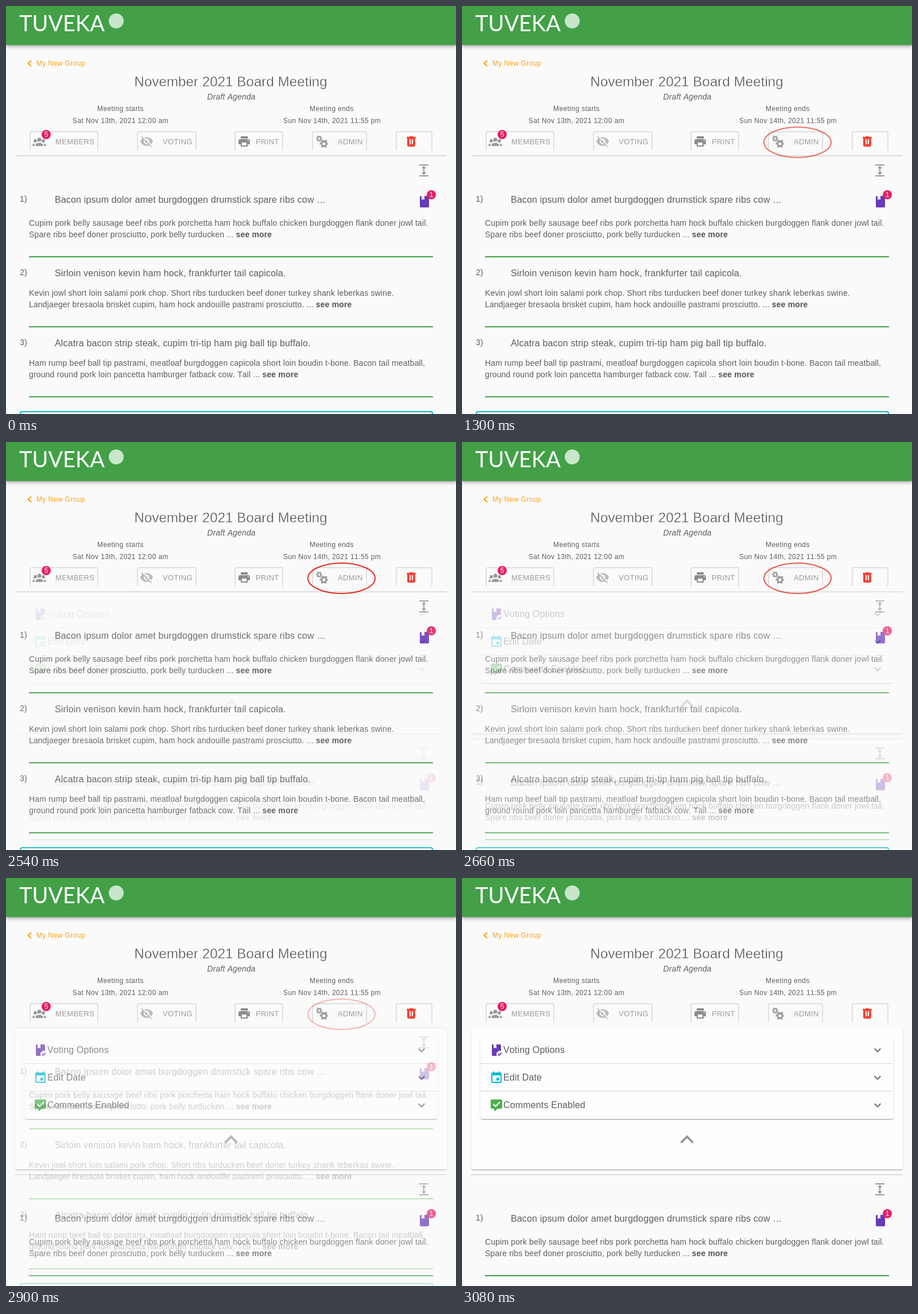
Animation, 784 px wide and 711 px high, one loop 5.08 s. Source, as an HTML page:

```html
<!DOCTYPE html>
<html lang="en">
<head>
<meta charset="utf-8">
<title>Board meeting agenda</title>
<style>
  html, body { margin: 0; width: 100%; height: 100%; overflow: hidden; background: #fafafa; }
  #stage { position: relative; width: 784px; height: 711px; overflow: hidden; background: #fafafa; }
  #stage div, svg { position: absolute; }
  svg { left: 0; top: 0; width: 784px; height: 711px; }
  #bar {
    left: 0; top: 0; width: 784px; height: 68px; background: #43a047;
    box-shadow: 0 2px 4px -1px rgba(0,0,0,.2), 0 4px 5px rgba(0,0,0,.14), 0 1px 10px rgba(0,0,0,.12);
  }
  #opened { inset: 0; opacity: 0; }
  #cover { left: 0; top: 257px; width: 784px; height: 454px; background: #fafafa; }
  .card {
    background: #fdfdfd; border-radius: 4px;
    box-shadow: 0 2px 1px -1px rgba(0,0,0,.2), 0 1px 1px rgba(0,0,0,.14), 0 1px 3px rgba(0,0,0,.12);
  }
  #drawer { left: 16px; top: 260px; width: 752px; height: 248px; }
  #options { left: 32px; top: 276px; width: 720px; height: 144px; }
  text { font-family: "Liberation Sans", Arial, sans-serif; font-kerning: none; fill: #5e5e5e; white-space: pre; }
  .title { font-size: 24px; letter-spacing: .1px; stroke: #fafafa; stroke-width: .45px; fill: #525252; }
  .head { font-size: 16px; letter-spacing: .15px; }
  .body { font-size: 14px; letter-spacing: .15px; }
  .small { font-size: 12px; letter-spacing: .4px; }
  .button { font-size: 13px; letter-spacing: .37px; fill: #9b9b9b; }
  .badge { font-size: 12px; fill: #fff; text-anchor: middle; }
  .brand { font: 38px Lato, sans-serif; fill: #fff; }
  .more { font-weight: bold; fill: #555; }
</style>
</head>
<body>
<div id="stage">
  <div id="bar"></div>
  <svg id="top"></svg>
  <svg id="closed"></svg>
  <div id="opened">
    <div id="cover"></div>
    <div id="drawer" class="card"></div>
    <div id="options" class="card"></div>
    <svg id="openedArt"></svg>
  </div>
  <svg><ellipse id="ring" cx="584.5" cy="237.5" rx="58.5" ry="26.5" fill="none" stroke="#e11b0c" stroke-width="2" opacity="0"/></svg>
</div>
<script>
const $ = id => document.getElementById(id);
const GREEN = '#43a047', GRAY = '#9a9a9a', PURPLE = '#673ab7';

const text = (cls, x, y, s, extra = '') => `<text class="${cls}" x="${x}" y="${y}" ${extra}>${s}</text>`;
const rect = (x, y, w, h, fill) => `<rect x="${x}" y="${y}" width="${w}" height="${h}" fill="${fill}"/>`;
const icon = (x, y, fill, d, scale = 1) =>
  `<path transform="translate(${x} ${y}) scale(${scale})" fill="${fill}" fill-rule="evenodd" d="${d}"/>`;
const badge = (x, y, n) => `<circle cx="${x}" cy="${y}" r="8" fill="#e91e63"/>` + text('badge', x, y + 4.2, n);

const ICONS = {
  eyeOff: 'M11.83 9L15 12.16V12A3 3 0 0 0 12 9ZM7.53 9.8L9.08 11.35A3 3 0 0 0 12.65 14.92L14.2 16.47A5 5 0 0 1 7.53 9.8ZM2 4.27L4.73 7C3.08 8.3 1.78 10 1 12C2.73 16.39 7 19.5 12 19.5C13.55 19.5 15.03 19.2 16.38 18.66L19.73 22L21 20.73L3.27 3ZM12 7A5 5 0 0 1 16.64 13.82L19.57 16.75C21.07 15.5 22.27 13.86 23 12C21.27 7.61 17 4.5 12 4.5C10.6 4.5 9.26 4.75 8 5.2L10.17 7.35C10.74 7.13 11.35 7 12 7Z',
  printer: 'M19 8H5a3 3 0 0 0-3 3v6h4v4h12v-4h4v-6a3 3 0 0 0-3-3zm-3 11H8v-5h8zm3-7a1 1 0 1 1 0-2 1 1 0 0 1 0 2zM18 3H6v4h12z',
  trash: 'M9 3V4H4V6H5V19A2 2 0 0 0 7 21H17A2 2 0 0 0 19 19V6H20V4H15V3ZM9 8H11V17H9ZM13 8H15V17H13Z',
  book: 'M18 22A2 2 0 0 0 20 20V4A2 2 0 0 0 18 2H12V9L9.5 7.5L7 9V2H6A2 2 0 0 0 4 4V20A2 2 0 0 0 6 22Z',
  bookCheck: 'M16.75 22.16L14 19.16L15.16 18L16.75 19.59L20.34 16L21.5 17.41ZM18 2A2 2 0 0 1 20 4V13.34A6 6 0 0 0 12.8 22H6A2 2 0 0 1 4 20V4A2 2 0 0 1 6 2H7V9L9.5 7.5L12 9V2Z',
  calendar: 'M17 12h-5v5h5zM16 1v2H8V1H6v2H5a2 2 0 0 0-2 2V19a2 2 0 0 0 2 2h14a2 2 0 0 0 2-2V5a2 2 0 0 0-2-2h-1V1zm3 18H5V8h14z',
  comment: 'M9 22A1 1 0 0 1 8 21V18H4A2 2 0 0 1 2 16V4A2 2 0 0 1 4 2H20A2 2 0 0 1 22 4V16A2 2 0 0 1 20 18H13.9L10.2 21.7Q9.8 22 9 22Z',
  down: 'M7.41 8.59L12 13.17l4.59-4.58L18 10l-6 6-6-6z',
  up: 'M7.41 15.41L12 10.83l4.59 4.58L18 14l-6-6-6 6z',
  fit: 'M0 0H16V2H0ZM0 19H16V21H0ZM8 2.5L12 7H9V14H12L8 18.5L4 14H7V7H4Z'
};

// Three heads with shoulders
function people(x, y) {
  const side = 'M0 20V18.5C0 17.1 1.9 15.9 4.45 15.6Q3.5 16.8 3.5 18.25V20Z';
  const half = `<circle cx="4.9" cy="11" r="2.9"/><path d="${side}"/>`;
  return `<g transform="translate(${x} ${y})" fill="${GRAY}">${half}<g transform="translate(24) scale(-1 1)">${half}</g>
    <circle cx="12" cy="9" r="4.3" fill="#fafafa"/><circle cx="12" cy="9" r="3.5"/>
    <path d="M5.5 20V18.25C5.5 16.2 8.4 14.5 12 14.5S18.5 16.2 18.5 18.25V20Z"/></g>`;
}

function cog(x, y, r) {
  const ring = (radius, width, dash = '') =>
    `<circle cx="${x}" cy="${y}" r="${radius}" fill="none" stroke="${GRAY}" stroke-width="${width}" ${dash}/>`;
  const rim = r * .87, tooth = Math.PI * rim / 6;
  return ring(r * .56, r * .42) + ring(rim, r * .27, `stroke-dasharray="${tooth}" stroke-dashoffset="${tooth / 2}"`);
}

const frame = (x1, x2) =>
  `<path d="M${x1 + 1} 251.5V222q0-3 3-3H${x2 - 4}q3 0 3 3V251.5" fill="none" stroke="#e0e0e0" stroke-width="2"/>`;

// One agenda entry; y is the heading's baseline, gap the step down to the body text
function item(n, y, gap, head, line1, line2) {
  return text('body', 24, y - 2, n + ')') + text('head', 85, y, head)
    + text('body', 40, y + gap, line1)
    + text('body', 40, y + gap + 20, `${line2} ... <tspan class="more">see more</tspan>`)
    + rect(40, y + gap + 53, 704, 2, GREEN);
}

// Divider, fit icon and first entry, shared by both states
function listStart(y) {
  return rect(16, y, 752, 2, '#dcdcdc') + icon(720, y + 16, GRAY, ICONS.fit)
    + item(1, y + 83, 40, 'Bacon ipsum dolor amet burgdoggen drumstick spare ribs cow …',
      'Cupim pork belly sausage beef ribs pork porchetta ham hock buffalo chicken burgdoggen flank doner jowl tail.',
      'Spare ribs beef doner prosciutto, pork belly turducken')
    + icon(717, y + 69, PURPLE, ICONS.book) + badge(741, y + 69, 1);
}

$('top').innerHTML =
  text('brand', 23, 44, 'TUVEKA') + '<circle cx="192" cy="26" r="13" fill="#c8e6c9"/>'
  + '<path d="M44 95l-5.5 5 5.5 5" fill="none" stroke="#ffa000" stroke-width="2"/>'
  + text('small', 53, 104, 'My New Group', 'style="fill:#ffa010"')
  + text('title', 223.5, 140, 'November 2021 Board Meeting')
  + text('body', 350.5, 163, 'Draft Agenda', 'font-style="italic"')
  + text('small', 159, 183, 'Meeting starts') + text('small', 116, 204, 'Sat Nov 13th, 2021 12:00 am')
  + text('small', 529, 183, 'Meeting ends') + text('small', 483, 204, 'Sun Nov 14th, 2021 11:55 pm')
  + [[41, 161], [228, 332], [398, 483], [533, 629], [679, 743]].map(b => frame(...b)).join('')
  + [[86, 'MEMBERS'], [273, 'VOTING'], [435, 'PRINT'], [578, 'ADMIN']]
    .map(([x, s]) => text('button', x, 240.5, s)).join('')
  + people(46, 224) + badge(70, 224, 5)
  + icon(233, 224, '#b8b8b8', ICONS.eyeOff) + icon(403, 224, '#8c8c8c', ICONS.printer)
  + cog(545.5, 231, 5.4) + cog(554, 240, 7.4)
  + icon(694, 224, '#f44336', ICONS.trash);

$('closed').innerHTML = listStart(260)
  + item(2, 471, 34, 'Sirloin venison kevin ham hock, frankfurter tail capicola.',
    'Kevin jowl short loin salami pork chop. Short ribs turducken beef doner turkey shank leberkas swine.',
    'Landjaeger bresaola brisket cupim, ham hock andouille pastrami prosciutto.')
  + item(3, 593, 34, 'Alcatra bacon strip steak, cupim tri-tip ham pig ball tip buffalo.',
    'Ham rump beef ball tip pastrami, meatloaf burgdoggen capicola short loin boudin t-bone. Bacon tail meatball,',
    'ground round pork loin pancetta hamburger fatback cow. Tail')
  + '<rect x="25" y="707" width="718" height="40" rx="3" fill="none" stroke="#12b5c9" stroke-width="2"/>';

$('openedArt').innerHTML = listStart(516)
  + rect(32, 323, 720, 1, '#d8d8d8') + rect(32, 371, 720, 1, '#d8d8d8')
  + [['Voting Options', PURPLE, 'bookCheck'], ['Edit Date', '#00bcd4', 'calendar'], ['Comments Enabled', '#4caf50', 'comment']]
    .map(([label, color, name], i) => {
      const y = 288 + 48 * i;
      return icon(48, y, color, ICONS[name]) + text('head', 72, y + 17, label) + icon(712, y, '#6a6a6a', ICONS.down);
    }).join('')
  + '<path d="M54.5 394l4 4 7.5-7.5" fill="none" stroke="#fff" stroke-width="2"/>'
  + icon(368, 432, GRAY, ICONS.up, 2);

// Fades advance by a tenth every 60 ms
const LOOP = 5080, STEP = 60;
const fade = (t, start) => Math.min(10, Math.max(0, Math.floor((t - start) / STEP) + 1)) / 10;

const began = performance.now();
function draw() {
  const t = (performance.now() - began) % LOOP;
  const open = fade(t, 2540);
  $('ring').setAttribute('opacity', fade(t, 1000) * (1 - open));
  $('opened').style.opacity = open;
  requestAnimationFrame(draw);
}
draw();
</script>
</body>
</html>
```
